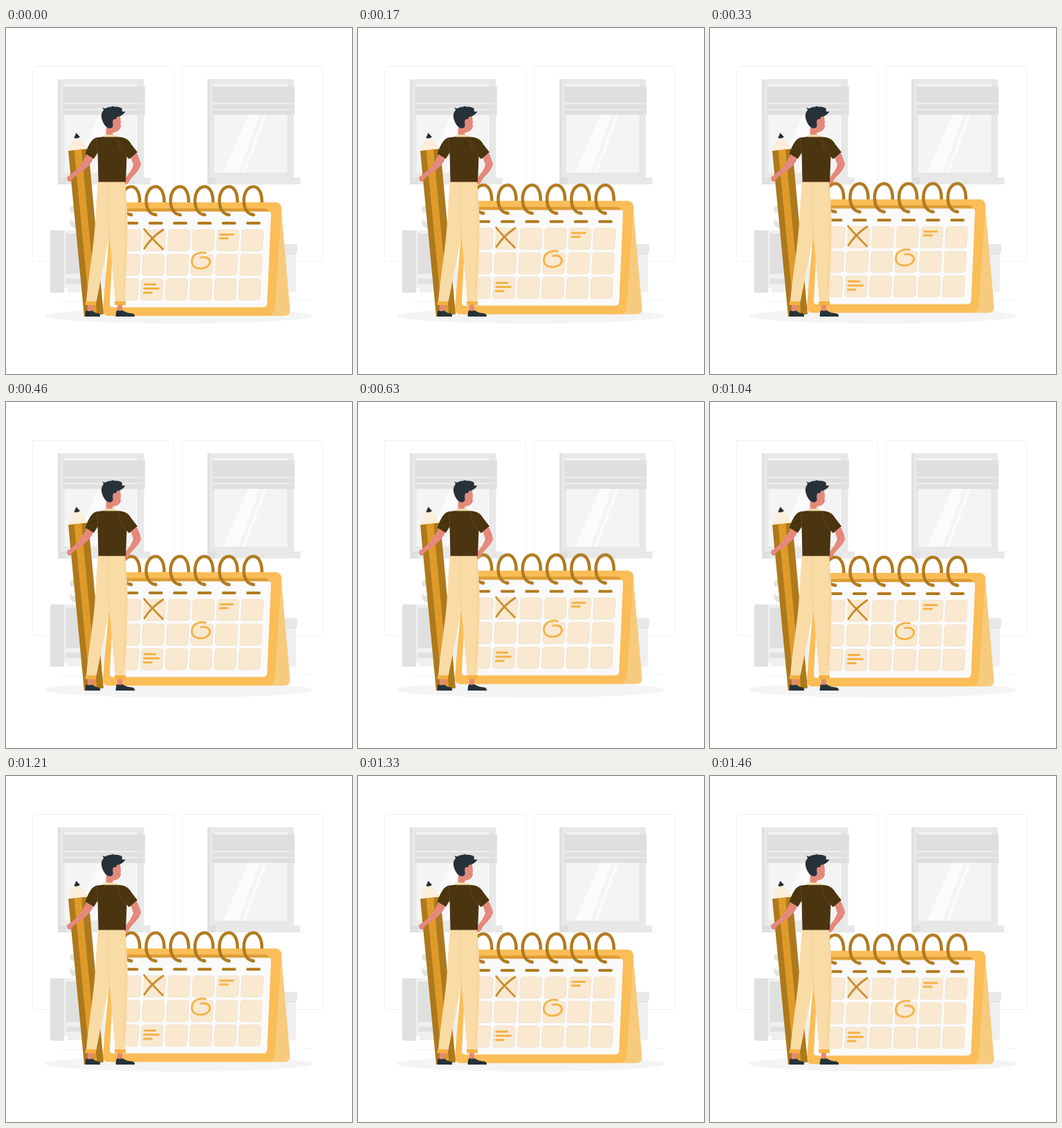
Write an HTML page that moves like this. It is 500 px wide and 500 px high and loops after 1500 ms.

```html
<!DOCTYPE html>
<html lang="en">
<head>
<meta charset="utf-8">
<title>Desk calendar</title>
<style>
  html, body { margin: 0; width: 100%; height: 100%; overflow: hidden; background: #fff; }
  svg { display: block; width: 100%; height: 100%; }
  .calendar { animation: float 1500ms linear -41.67ms infinite; }
  @keyframes float {
    0%, 100% { transform: translateY(.56px); }
    50% { transform: translateY(-9.44px); }
  }
  .stroke { fill: none; stroke-linecap: round; stroke-linejoin: round; }
  .skin { fill: #e4897b; }
  .dark { fill: #263238; }
  .shirt { fill: #4b3410; }
  .pants { fill: #f9dba6; }
  .cuff { fill: #f6b140; }
</style>
</head>
<body>
<svg viewBox="0 0 500 500">
  <defs>
    <g id="window">
      <rect x="78" y="74" width="121.500" height="148" fill="#e8e8e8"/>
      <rect x="75" y="74" width="3" height="148" fill="#dedede"/>
      <rect x="84.500" y="81" width="107" height="128" fill="#f4f4f4"/>
      <path d="M190.500 81h1.500v128h-1.500z" fill="#e0e0e0"/>
      <path d="M97.500 209L134 125h16.500L120 209zM125 209L156 125h5L129.500 209z" fill="#fbfbfb"/>
      <path d="M82 84.500h119v24H82zM82 110h119v7H82zM82 118.500h119v7H82z" fill="#dfdfdf"/>
      <rect x="75" y="216" width="134" height="10" fill="#e8e8e8"/>
      <rect x="75" y="216" width="12" height="10" fill="#dfdfdf"/>
    </g>
    <rect id="cell" x="164.500" y="291.500" width="31" height="30.500" rx="3.500"/>
    <g id="row">
      <use href="#cell"/>
      <use href="#cell" x="35.300"/>
      <use href="#cell" x="70.600"/>
      <use href="#cell" x="105.900"/>
      <use href="#cell" x="141.200"/>
      <use href="#cell" x="176.500"/>
    </g>
    <g id="ring" class="stroke" stroke="#b07a1e">
      <path d="M193.300 252C193.600 239 189 229.200 181 229.200C173 229.200 167.200 238 167.200 249.500C167.200 262 173 269.500 181.300 269.900" stroke-width="4.500" stroke-linecap="butt"/>
      <path d="M179.500 269.700L181.300 269.900" stroke-width="4.500"/>
      <path d="M172.500 282h17" stroke-width="3.800"/>
    </g>
  </defs>

  <!-- Room -->
  <g fill="none" stroke="#f1f1f1">
    <rect x="38.500" y="55.500" width="203.500" height="282" rx="2.500"/>
    <rect x="254.500" y="55.500" width="203.500" height="282" rx="2.500"/>
    <path d="M80 395.500h230M330 393.500h93M428 393.500h12"/>
  </g>
  <use href="#window"/>
  <use href="#window" x="216.300"/>
  <path d="M100 256C92 256 90 263 95 267L104 268V257zM92 277C91 285 96 291 104 290V280C100 281 95 280 92 277z" fill="#e3e3e3"/>
  <path d="M84 292.500h60v89.500H89V376h-5z" fill="#f0f0f0"/>
  <path d="M64 292.500h20v90H64zM86.500 297h50v58.500h-50zM86.500 362.500h50v7h-50z" fill="#e0e0e0"/>
  <path d="M370 325h49v57h-49z" fill="#efefef"/>
  <path d="M370 325h49v2h-49z" fill="#e0e0e0"/>
  <rect x="365" y="312" width="56" height="13.500" rx="2" fill="#e8e8e8"/>
  <ellipse cx="249.500" cy="416" rx="193.500" ry="11" fill="#f4f4f4"/>

  <!-- Calendar -->
  <g class="calendar">
    <path d="M380 252H389Q396.500 252 397.500 260L410.500 407Q411 416 402 416H370z" fill="#f7cb7e"/>
    <path d="M163 252H388Q398.500 252 398 263L388.300 405Q387.300 416 377 416H149Q139 416 140 406L152.500 261Q153.500 252 163 252z" fill="#fabd57"/>
    <path d="M163 260.700H373Q380 260.700 380 267H160z" fill="#dc9c33"/>
    <path d="M161 265.300H379Q383.300 265.300 383 270L377.300 398Q377 403.400 372 403.400H154Q149.500 403.400 150 398.500L156.500 270Q157 265.300 161 265.300z" fill="#fafafa"/>
    <g transform="translate(14.800) skewX(-2.900)" fill="#f9e9d1" stroke="#f2dfc0" stroke-width=".8">
      <use href="#row"/>
      <use href="#row" y="35.500"/>
      <use href="#row" y="71"/>
    </g>
    <use href="#ring"/>
    <use href="#ring" x="35.300"/>
    <use href="#ring" x="70.600"/>
    <use href="#ring" x="105.900"/>
    <use href="#ring" x="141.200"/>
    <use href="#ring" x="176.500"/>
    <path class="stroke" d="M199.500 290.500C207 300 217 310 226.500 319.500M227 291.500C217 298 206 309 200 318.500" stroke="#c68b24" stroke-width="2.700"/>
    <g class="stroke" stroke="#f3b145" stroke-width="2.800">
      <path d="M288.500 324.800C277 322.500 268 329 268.500 338C269 346 277 348.500 284 347.300C292 346 296 340.500 294.300 336C292.500 331.500 286.500 330.300 281.500 331.500"/>
      <path d="M309.500 298.500h18.500M309 304h11.500M200 370.500h16M199.700 376.500h21M199.300 382.500h11"/>
    </g>
  </g>

  <!-- Pencil -->
  <path d="M101.500 152L90 177.500L119 174.500z" fill="#fbeed8"/>
  <path class="dark" d="M101.500 151.500L98.300 158.700Q102.500 160.500 107 157.500z"/>
  <path d="M90 177.500L119 174.500L141 413.500L113 417z" fill="#ad791c"/>
  <path d="M98.500 176.500L109 175.500L131.500 414.700L121.500 416z" fill="#df9b2a"/>

  <!-- Legs -->
  <path class="skin" d="M118 399h8.500l-1 10h-7.500zM161 399h7v10h-7z"/>
  <path class="dark" d="M115.500 408.500Q121 410 125 408.500Q128 412 134 412.500Q136.500 414 136 417H114.500Q114 412 115.500 408.500zM160 408Q165 409.500 168.500 408Q174 412 183 412.500Q186.500 414 186 417H158.500Q158.500 412 160 408z"/>
  <path class="pants" d="M133.500 221.500H172.500C173.500 245 176.500 270 176 302L172.300 396H158L149.500 300L130.500 396H116C119 360 126 320 128.500 288C130 263 131 240 133.500 221.500z"/>
  <path class="stroke" d="M147.500 223C147 250 147.500 278 149.500 302M171 224C173.500 255 174.500 290 170 380" stroke="#f0cb8c" stroke-width=".8"/>
  <path class="cuff" d="M115 395h15.500l-.8 5.500H114.500zM157 395h16v5.500h-15.500z"/>

  <!-- Arms -->
  <path class="skin" d="M117 182L126.500 188C122 200 109 208 98 216L93 222Q89 222 88 218Q87.500 215 92 213C101 207 110 196 117 182z"/>
  <path class="skin" d="M180 186L189 181C192 187 195 194 195 198C192 207 184 213 179.500 219Q177 226 172.500 226Q170.500 221 172.500 217C177 212 182 204 184 198z"/>

  <!-- Torso -->
  <path class="shirt" d="M130 158.500Q146 155.500 163 157.500C173 158 178 162 181 168L190 179.500L178 189.500L174.500 186L173 222.500H133.500L132.500 180L127 189L114.500 181.500C119 170 123 161 130 158.500z"/>
  <path class="stroke" d="M130.500 160C132.500 168 133 175 132 182M162.500 160C161 169 167 179 175 186" stroke="#6b4d1c" stroke-width=".8"/>
  <path d="M139 157Q144 153 149 153.500Q156 153 161.500 157Q150 158 139 157z" fill="#f5dba9"/>

  <!-- Head -->
  <path class="skin" d="M145 140L155 130L164.500 125C165.500 129 165 132 166.300 136L165.300 139L166 142C165.500 147 161 150.500 154.500 151V153.500Q149 155 144.500 153.500z"/>
  <path class="dark" d="M141 119L139.700 115L143 116.500Q147 113.500 152 114L153.500 112.800C158 115 164 112.500 168 117L167.500 120Q170 121.500 172.500 120.500C170 125.500 165 128 160.500 128.500L158.500 132C155.500 130 153.500 133 154.500 139C155.500 144 151 146 147 144.300C140.500 140.500 136.500 129 138.300 123.500Q139 120.500 141 119z"/>
</svg>
</body>
</html>
```
